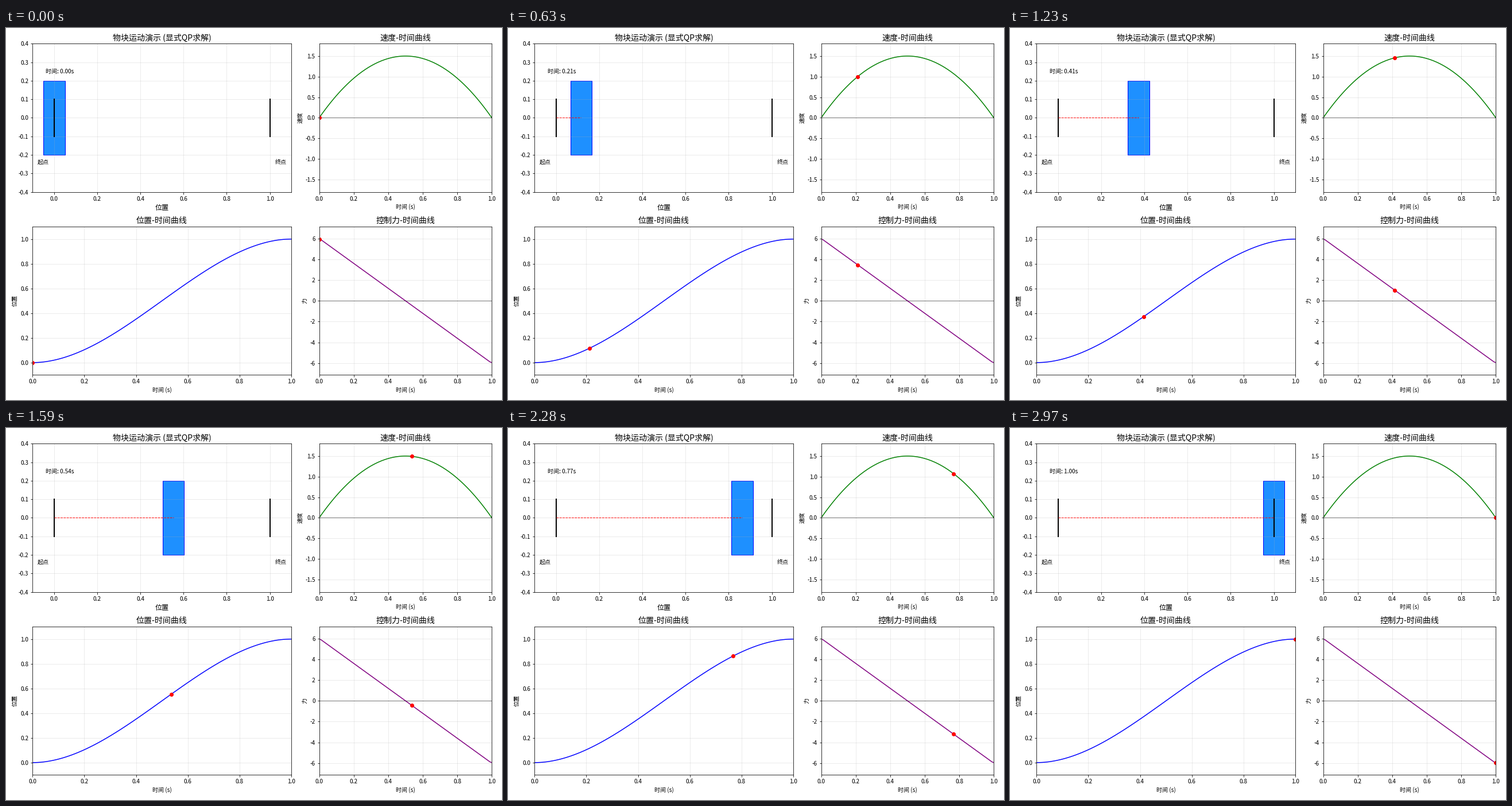
Recreate the animation shown at these times as a matplotlib script. Size 864 px wide and 648 px high, loop 3000 ms.

```python
import numpy as np
import matplotlib.pyplot as plt
from matplotlib.animation import FuncAnimation
from matplotlib.patches import Rectangle

plt.rcParams["font.family"] = "Noto Sans CJK JP"
plt.rcParams["axes.unicode_minus"] = False

W, H, DPI = 864, 648, 72
N, INTERVAL = 100, 30
BLOCK_W, BLOCK_H = 0.1, 0.4

# Panel layout in pixels: (left, width) per column, top per row
LEFT, RIGHT = (46.16, 451.05), (545.55, 300.7)
TOP, BOTTOM = 27.35, 346.15
PANEL_H = 258.2

# Minimum-effort transfer from 0 to 1 in one second
t = np.linspace(0, 1, N)
pos = 3 * t**2 - 2 * t**3
vel = 6 * t - 6 * t**2
force = np.gradient(vel, t)

fig = plt.figure(figsize=(W / DPI, H / DPI), dpi=DPI, facecolor="white")


def panel(column, top, title, xlabel, xlim, ylim, label_size=10):
    left, width = column
    ax = fig.add_axes([left / W, 1 - (top + PANEL_H) / H, width / W, PANEL_H / H])
    ax.set_title(title, fontsize=14)
    ax.set_xlabel(xlabel, fontsize=label_size)
    ax.set_xlim(*xlim)
    ax.set_ylim(*ylim)
    ax.grid(True, alpha=0.3)
    return ax


def curve_panel(column, top, name, ylabel, data, color, ylim, zero_line=True):
    ax = panel(column, top, f"{name}-时间曲线", "时间 (s)", (0, 1), ylim)
    ax.set_ylabel(ylabel, fontsize=10)
    ax.plot(t, data, color=color, lw=1.5)
    if zero_line:
        ax.axhline(0, color="black", lw=1, alpha=0.5)
    dot, = ax.plot([], [], "ro", ms=6)
    return dot, data


scene = panel(LEFT, TOP, "物块运动演示 (显式QP求解)", "位置",
              (-0.1, 1.1), (-0.4, 0.4), label_size=12)
for x, label_x, label in ((0, -0.05, "起点"), (1, 1.05, "终点")):
    scene.plot([x, x], [-0.1, 0.1], "k-", lw=2)
    scene.text(label_x, -0.25, label, ha="center", fontsize=10)

block = Rectangle((-BLOCK_W / 2, -BLOCK_H / 2), BLOCK_W, BLOCK_H,
                  fc="dodgerblue", ec="blue")
scene.add_patch(block)
trail, = scene.plot([], [], "r--", lw=1)
clock = scene.text(0.05, 0.8, "", transform=scene.transAxes, fontsize=10)

v_max, f_max = 1.2 * vel.max(), 1.2 * force.max()
markers = [
    curve_panel(RIGHT, TOP, "速度", "速度", vel, "green", (-v_max, v_max)),
    curve_panel(LEFT, BOTTOM, "位置", "位置", pos, "blue", (-0.1, 1.1), False),
    curve_panel(RIGHT, BOTTOM, "控制力", "力", force, "purple", (-f_max, f_max)),
]


def update(i):
    block.set_x(pos[i] - BLOCK_W / 2)
    trail.set_data([0, pos[i]], [0, 0])
    clock.set_text(f"时间: {t[i]:.2f}s")
    for dot, data in markers:
        dot.set_data([t[i]], [data[i]])
    return [block, trail, clock] + [dot for dot, _ in markers]


anim = FuncAnimation(fig, update, frames=N, interval=INTERVAL,
                     repeat=True, repeat_delay=0, blit=False)
plt.show()
```
